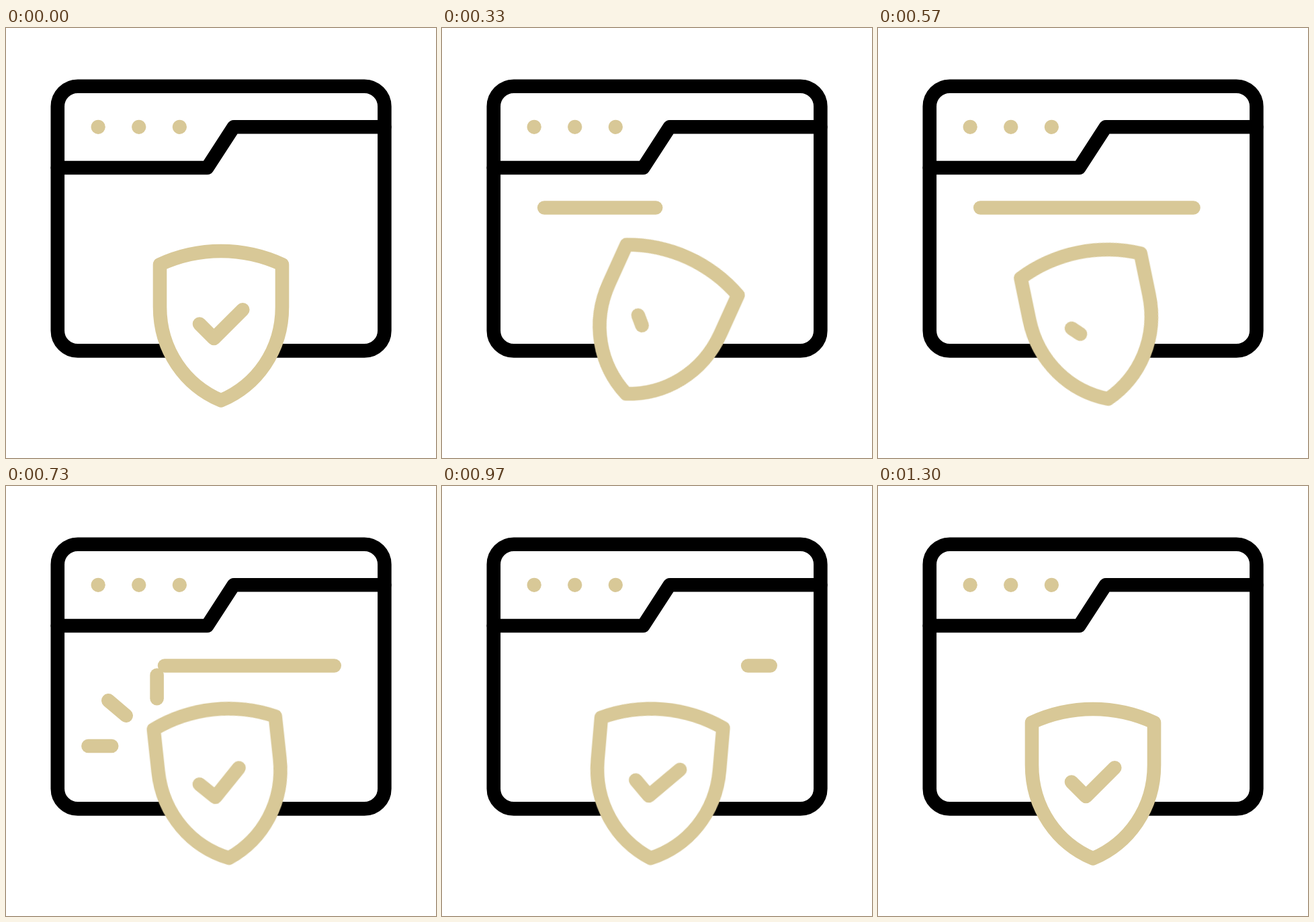
An HTML page that plays this animation: 640 by 640 pixels, repeating every 1670 ms.

```html
<!DOCTYPE html>
<html lang="en">
<head>
<meta charset="utf-8">
<title>Secure folder</title>
<style>
  @property --from { syntax: "<number>"; inherits: false; initial-value: 0; }
  @property --to { syntax: "<number>"; inherits: false; initial-value: 100; }

  html, body { margin: 0; width: 100%; height: 100%; overflow: hidden; background: #fff; }
  svg { display: block; width: 100%; height: 100%; }

  :root {
    --loop: 1670ms infinite;
    --ease: cubic-bezier(.3333, 0, .6667, 1);
  }

  .line { fill: none; stroke-width: 20.6; stroke-linecap: round; stroke-linejoin: round; }
  .dark { stroke: #000; }
  .gold { stroke: #d8c897; }
  .dots { fill: #d8c897; }

  /* Shows only the part of a path between --from and --to percent. */
  .trim {
    stroke-dasharray: calc((var(--to) - var(--from)) * 1px) 300px;
    stroke-dashoffset: calc(var(--from) * -1px);
  }

  .shield {
    transform-origin: 320px 443px;
    animation: swing var(--loop) var(--ease);
  }
  .shield .body { fill: #fff; }
  .check { animation: redraw var(--loop) var(--ease), blink var(--loop) step-end; }
  .bar {
    animation: bar-to var(--loop) var(--ease), bar-from var(--loop) var(--ease),
      bar-show var(--loop) step-end;
  }
  .ray {
    animation: ray-to var(--loop) var(--ease), ray-from var(--loop) var(--ease),
      ray-show var(--loop) step-end;
  }

  @keyframes swing {
    0%, 4.4% { transform: rotate(0deg); }
    18.4% { transform: rotate(25deg); }
    37.6% { transform: rotate(-15deg); }
    52.6% { transform: rotate(9deg); }
    67.6% { transform: rotate(-4.3deg); }
    78%, 100% { transform: rotate(0deg); }
  }

  @keyframes redraw {
    0%, 4.5% { --to: 100; }
    25.5%, 30% { --to: 0; }
    46%, 100% { --to: 100; }
  }
  @keyframes blink {
    0% { opacity: 1; }
    25.5% { opacity: 0; }
    30.3%, 100% { opacity: 1; }
  }

  @keyframes bar-to {
    0% { --to: 0; }
    40%, 100% { --to: 100; }
  }
  @keyframes bar-from {
    0%, 34% { --from: 0; }
    64%, 100% { --from: 100; }
  }
  @keyframes bar-show {
    0% { opacity: 0; }
    1% { opacity: 1; }
    63.8%, 100% { opacity: 0; }
  }

  @keyframes ray-to {
    0%, 34% { --to: 0; }
    45.2%, 100% { --to: 100; }
  }
  @keyframes ray-from {
    0%, 40% { --from: 0; }
    52%, 100% { --from: 100; }
  }
  @keyframes ray-show {
    0% { opacity: 0; }
    35% { opacity: 1; }
    51.8%, 100% { opacity: 0; }
  }
</style>
</head>
<body>
<svg viewBox="0 0 640 640">
  <g class="line dark">
    <rect x="76.8" y="86.8" width="486.6" height="393.6" rx="30"/>
    <path d="M76.8 208H299.5L339 147.2H563.4"/>
  </g>

  <g class="dots">
    <circle cx="137.2" cy="147.3" r="10.6"/>
    <circle cx="197.8" cy="147.3" r="10.6"/>
    <circle cx="258.4" cy="147.3" r="10.6"/>
  </g>

  <g class="line gold">
    <path class="trim bar" pathLength="100" d="M152.2 267.5H488.7"/>
    <path class="trim ray" pathLength="100" d="M224.6 327.5V279.5"/>
    <path class="trim ray" pathLength="100" d="M187.3 349L150.7 318"/>
    <path class="trim ray" pathLength="100" d="M168.5 387H120.3"/>
  </g>

  <g class="line gold shield">
    <path class="body" d="M229 352A217 217 0 0 1 411 352V415C411 480 373 532 320 554.3C267 532 229 480 229 415Z"/>
    <path class="trim check" pathLength="100" d="M288 440.5L309.5 462L352.3 419.2"/>
  </g>
</svg>
</body>
</html>
```
